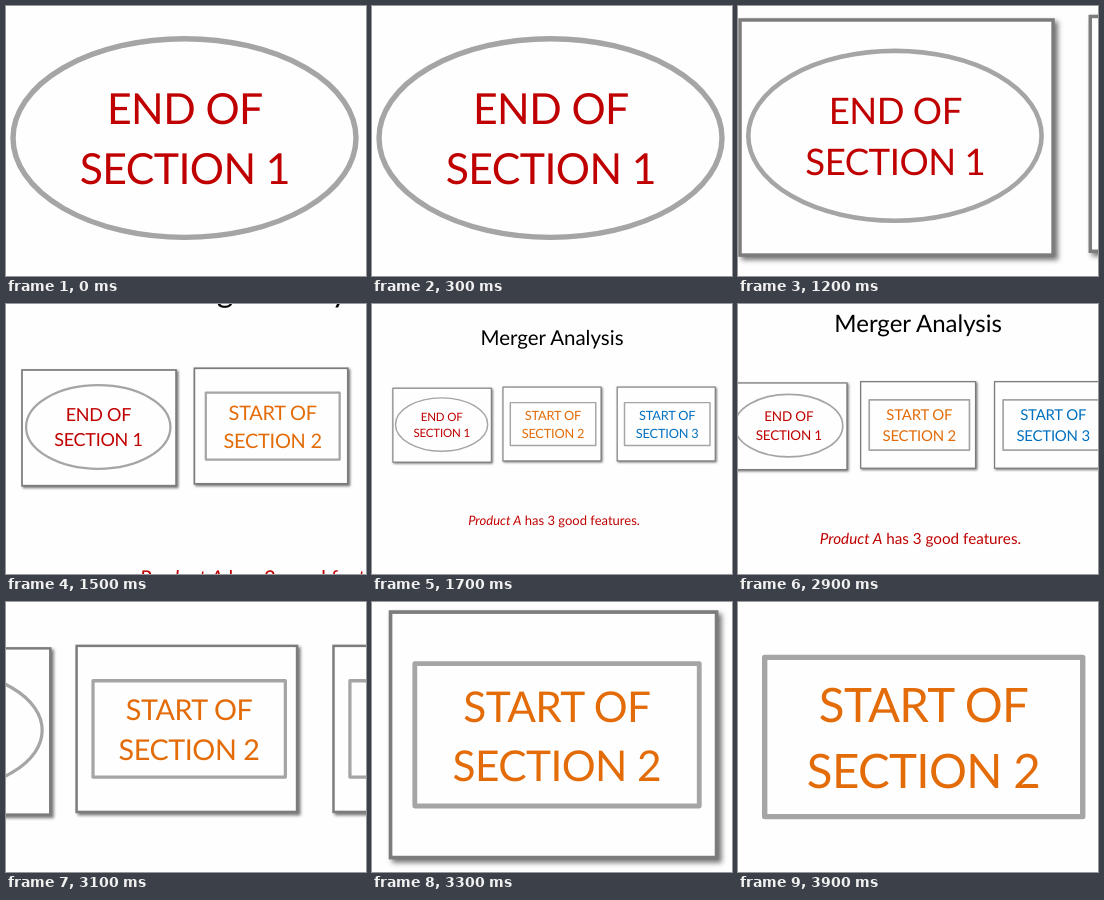
An HTML page for the animation above (4.6 s loop, 360 by 270 pixels).

```html
<!DOCTYPE html>
<html lang="en">
<head>
<meta charset="utf-8">
<title>Section zoom</title>
<style>
  html, body { margin: 0; width: 100%; height: 100%; overflow: hidden; background: #fefefe; }
  svg { display: block; width: 100vw; height: 100vh; }
  text {
    font-family: Lato, "Open Sans", sans-serif;
    text-anchor: middle;
    text-rendering: geometricPrecision;
  }
  .label { letter-spacing: -.014em; }
  .card { fill: #fefefe; stroke: #7c7c7c; stroke-width: 1.1; filter: drop-shadow(1px 1px .8px #0008); }
  .full .card { display: none; }
  .frame { fill: none; stroke: #a5a5a5; stroke-width: 1.45; stroke-linejoin: round; }
  .red { fill: #c00000; }
  .orange { fill: #e36c09; }
  .blue { fill: #0070c0; }
</style>
</head>
<body>
<svg viewBox="0 0 360 270">
  <g id="scene">
    <text x="180" y="40.8" font-size="20.5">Merger Analysis</text>

    <rect class="card" x="20.9" y="84.2" width="98.4" height="73.9"/>
    <ellipse class="frame" cx="69.6" cy="120.6" rx="46.1" ry="26.7"/>
    <g class="label red" font-size="11.5">
      <text x="69.7" y="116.8">END OF</text>
      <text x="69.7" y="132.9">SECTION 1</text>
    </g>

    <g class="orange">
      <rect class="card" x="131" y="83.1" width="98" height="73.8"/>
      <rect class="frame" x="138.3" y="98.6" width="85.5" height="42.8"/>
      <g class="label" font-size="12.75">
        <text x="181" y="116">START OF</text>
        <text x="181" y="133.8">SECTION 2</text>
      </g>
    </g>

    <g class="blue" transform="translate(114.2 0)">
      <rect class="card" x="131" y="83.1" width="98" height="73.8"/>
      <rect class="frame" x="138.3" y="98.6" width="85.5" height="42.8"/>
      <g class="label" font-size="12.75">
        <text x="181" y="116">START OF</text>
        <text x="181" y="133.8">SECTION 3</text>
      </g>
    </g>

    <text class="red" x="182" y="221.3" font-size="13"><tspan font-style="italic">Product A</tspan> has 3 good features.</text>
  </g>
</svg>
<script>
  const LOOP = 4600, STEP = 100, ZOOM_MS = 505, MAX_SCALE = 3.72;
  const scene = document.getElementById("scene");
  const clamp = v => Math.min(1, Math.max(0, v));

  // Offsets that centre each section at full zoom
  const first = { x: -80.4, y: -316.6 };
  const second = { x: -487.8, y: -311.4 };

  function draw(time) {
    const t = Math.floor(time % LOOP / STEP) * STEP;
    const leaving = t < 2400;
    const zoom = clamp((leaving ? 1605 - t : t - 2868) / ZOOM_MS);
    const { x, y } = leaving ? first : second;
    const scale = 1 + (MAX_SCALE - 1) * zoom;
    scene.setAttribute("transform", `translate(${x * zoom} ${y * zoom}) scale(${scale})`);
    scene.classList.toggle("full", zoom === 1);
  }

  const start = performance.now();
  function tick() {
    draw(performance.now() - start);
    requestAnimationFrame(tick);
  }
  tick();
</script>
</body>
</html>
```
